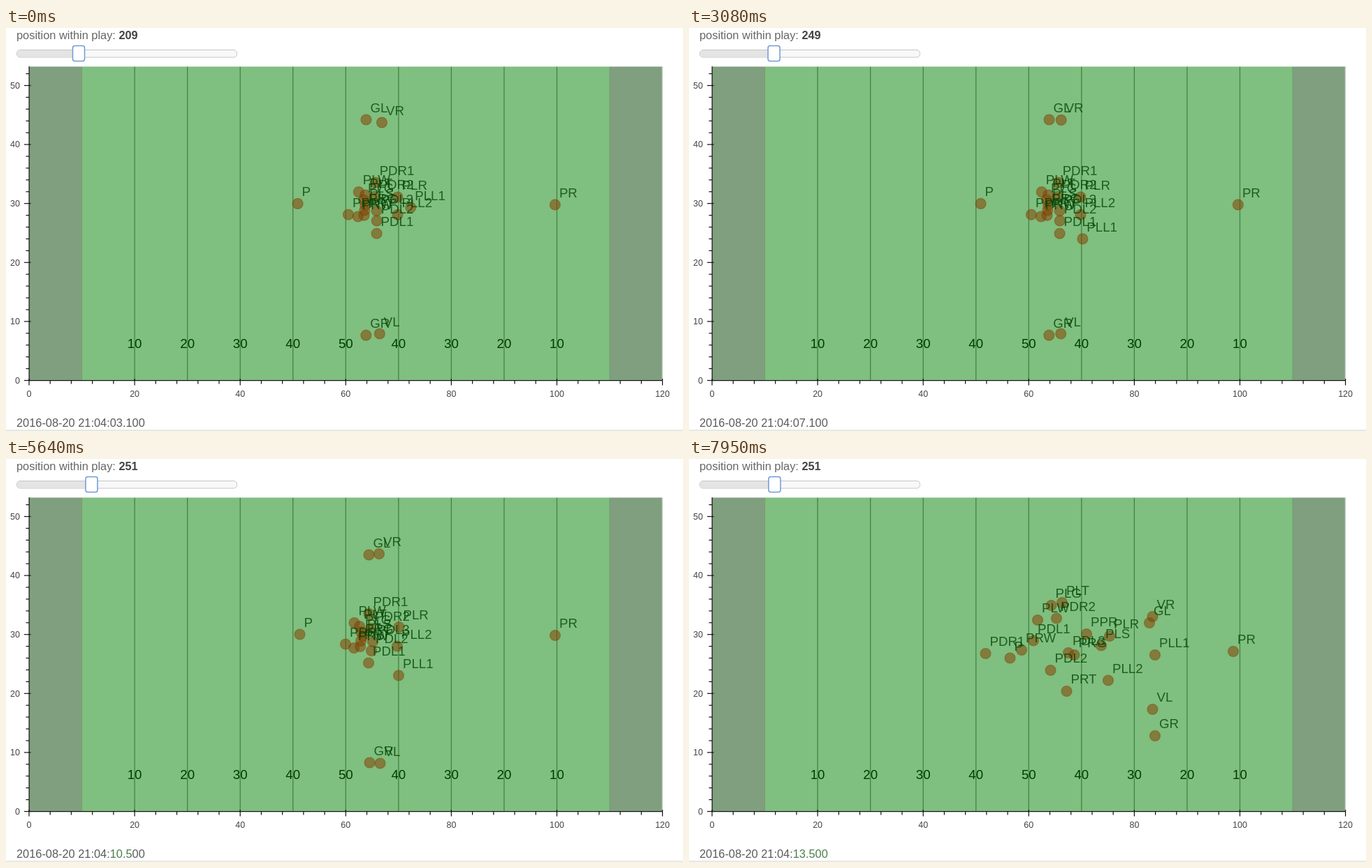
Animation, 969 px wide and 578 px high, one loop 8 s. Source, as an HTML page with a canvas:

```html
<!DOCTYPE html>
<html lang="en">
<head>
<meta charset="utf-8">
<title>Play tracker</title>
<style>
  html, body { margin: 0; width: 100%; height: 100%; overflow: hidden; background: #fff; }
  canvas { display: block; width: 969px; height: 578px; }
</style>
</head>
<body>
<canvas id="stage"></canvas>
<script>
const W = 969, H = 578, LOOP = 8000;
const canvas = document.getElementById('stage');
const ctx = canvas.getContext('2d');
const ratio = window.devicePixelRatio || 1;
canvas.width = W * ratio;
canvas.height = H * ratio;
ctx.scale(ratio, ratio);

const FONT = '"Liberation Sans", Arial, Helvetica, sans-serif';
const px = v => 33 + v * 7.555;
const py = v => 505.5 - v * 8.46;

// One data tick is a tenth of a second of play.
const TICK_MS = 76.7, FIRST_MS = 70;
const SET = 72, SNAP = 74, MID = 84, END = 104;
const WALK_TICKS = 48;

// Parabola through three places: at the snap, in mid-run and at the end.
function run(a, b, c, k) {
  const v1 = (b - a) / (MID - SNAP), v2 = (c - b) / (END - MID);
  const bend = (v2 - v1) / (END - SNAP);
  return a + (k - SNAP) * (v1 + bend * (k - MID));
}

// Players hold their set position before the snap; some first walk to it.
const players = [];
function player(name, snap, mid, end, walk = [0, 0]) {
  const axis = i => tick => {
    const left = Math.max(0, 1 - tick / WALK_TICKS) ** 1.2;
    return run(snap[i], mid[i], end[i], Math.max(tick, SET)) + walk[i] * left;
  };
  players.push({ name, x: axis(0), y: axis(1) });
}

player('GL',   [519.5, 137.5], [549.5, 168.5], [659, 235]);
player('VR',   [534, 136],     [556.5, 161],   [663.5, 226], [6, 4]);
player('GR',   [520.5, 435.5], [555, 414.5],   [667, 397]);
player('VL',   [535.5, 436.5], [563, 420.5],   [663.5, 359], [3, 0]);
player('P',    [420.5, 251.5], [434.5, 254.5], [459.5, 285.5]);
player('PR',   [786, 253],     [785.5, 254.5], [779, 276]);
player('PLR',  [562.5, 241],   [573.5, 238],   [602, 254]);
player('PLL1', [562, 310.5],   [577.5, 313.5], [667, 281], [18, -51]);
player('PLL2', [560, 268.5],   [563.5, 277],   [600, 317.5]);
player('PDR1', [519.5, 222],   [479, 230],     [424.5, 279]);
player('PDR2', [522, 243],     [505, 245],     [526, 228.5]);
player('PDL1', [519, 292.5],   [479.5, 281.5], [493, 260.5]);
player('PDL2', [523, 275],     [498, 274],     [517.5, 303]);
player('PDL3', [525, 262],     [510, 263],     [543, 278]);
player('PLW',  [498.5, 235],   [479, 234],     [499, 231]);
player('PRW',  [498, 271],     [477, 273],     [476, 274]);
player('PLT',  [506, 240],     [484, 237],     [534, 206]);
player('PRT',  [507, 269],     [494, 278],     [540.5, 333]);
player('PLG',  [508, 248],     [497, 248],     [518.5, 210]);
player('PRG',  [508, 261],     [497, 262],     [551.5, 281]);
player('PLS',  [511, 254],     [511, 255],     [590, 267.5]);
player('PPR',  [486, 265.5],   [484, 257],     [569, 251]);

function text(str, x, y, size, color, align = 'left', weight = '') {
  ctx.font = `${weight} ${size}px ${FONT}`;
  ctx.fillStyle = color;
  ctx.textAlign = align;
  ctx.fillText(str, x, y);
  return ctx.measureText(str).width;
}

function rect(x, y, w, h, color) {
  ctx.fillStyle = color;
  ctx.fillRect(x, y, w, h);
}

function pill(x, y, w, h, r, fill, stroke, width = 1) {
  ctx.beginPath();
  ctx.roundRect(x, y, w, h, r);
  ctx.fillStyle = fill;
  ctx.fill();
  if (!stroke) return;
  ctx.strokeStyle = stroke;
  ctx.lineWidth = width;
  ctx.stroke();
}

// The slider is dragged fast at first, then slowly.
function sliderValue(tick) {
  const grow = (from, to, by) => by * Math.min(1, Math.max(0, (tick - from) / (to - from)));
  return Math.round(209 + grow(0, 12, 25) + grow(12, 31, 11) + grow(31, 44, 6));
}

function drawSlider(value) {
  const w = text('position within play: ', 15, 15.5, 16.38, '#666');
  text(value, 15 + w, 15.5, 16.38, '#444', 'left', 'bold');
  const x = 104 + (value - 209) * 0.44;
  pill(15.5, 31.5, 315, 10.5, 4.5, '#f8f8f8', '#c6c6c6');
  pill(16, 32, x - 16, 9.5, 4, '#e4e4e4');
  pill(x - 8.5, 25.5, 17, 22, 3, '#fff', '#6f9ad8', 1.5);
}

function drawField() {
  const top = 55, h = 450.5, left = px(0), right = px(120);
  rect(left, top, right - left, h, '#7f9f7f');
  rect(px(10), top, px(110) - px(10), h, '#7fbf7f');
  rect(px(10) - 0.5, top, 1, h, '#7f9a6c');
  rect(px(110) - 0.5, top, 1, h, '#6f9f6f');
  for (let v = 20; v <= 100; v += 10) rect(px(v) - 0.6, top, 1.2, h, '#3f7f3f');
  const edge = 'rgba(229,229,229,0.5)';
  rect(left, top, right - left, 1, edge);
  rect(right - 1, top, 1, h, edge);
}

function drawAxes() {
  const ink = '#111';
  rect(32.5, 55, 1.2, 451, ink);
  rect(32.5, 505, 907.5, 1.2, ink);
  for (let v = 0; v <= 120; v += 4) {
    const major = v % 20 === 0;
    rect(px(v) - 0.6, major ? 503 : 505.5, 1.2, major ? 9.5 : 5, ink);
    if (major) text(v, px(v), 528.5, 12.5, '#444', 'center');
  }
  for (let v = 0; v <= 52; v += 2) {
    const major = v % 10 === 0;
    rect(major ? 26 : 28.5, py(v) - 0.6, major ? 9.5 : 4.5, 1.2, ink);
    if (major) text(v, 20, py(v) + 4.2, 12.5, '#444', 'right');
  }
  for (let v = 20; v <= 100; v += 10) {
    text(50 - Math.abs(60 - v), px(v), 459, 18.67, '#003c00', 'center');
  }
}

function drawPlayers(tick) {
  const spots = players.map(p => ({ name: p.name, x: p.x(tick), y: p.y(tick) }));
  ctx.lineWidth = 1.2;
  ctx.strokeStyle = 'rgba(136,64,0,0.45)';
  for (const s of spots) {
    ctx.beginPath();
    ctx.arc(s.x, s.y, 7.5, 0, Math.PI * 2);
    ctx.fillStyle = 'rgba(130,62,0,0.53)';
    ctx.fill();
    ctx.stroke();
  }
  for (const s of spots) text(s.name, s.x + 6, s.y - 10.7, 18.67, 'rgba(0,64,0,0.77)');
}

function drawClock(tick, t) {
  const tenths = 31 + tick;
  const secs = `${String(Math.floor(tenths / 10)).padStart(2, '0')}.${tenths % 10}`;
  const grey = '#5a5a5a', green = '#4c7d49';
  let x = 15;
  x += text('2016-08-20 21:04:', x, 572, 16.38, grey);
  x += text(secs, x, 572, 16.38, t >= 4330 ? green : grey);
  text('00', x, 572, 16.38, t >= 5720 ? green : grey);
}

function draw(t) {
  const tick = t < FIRST_MS ? 0 : Math.floor(t / TICK_MS + 0.8);
  rect(0, 0, W, H, '#fff');
  drawSlider(sliderValue(tick));
  drawField();
  drawAxes();
  drawPlayers(tick);
  drawClock(tick, t);
  rect(0, 576.5, W, 1, '#d0d0d0');
}

const start = performance.now();
function loop() {
  draw((performance.now() - start) % LOOP);
  requestAnimationFrame(loop);
}
loop();
</script>
</body>
</html>
```
